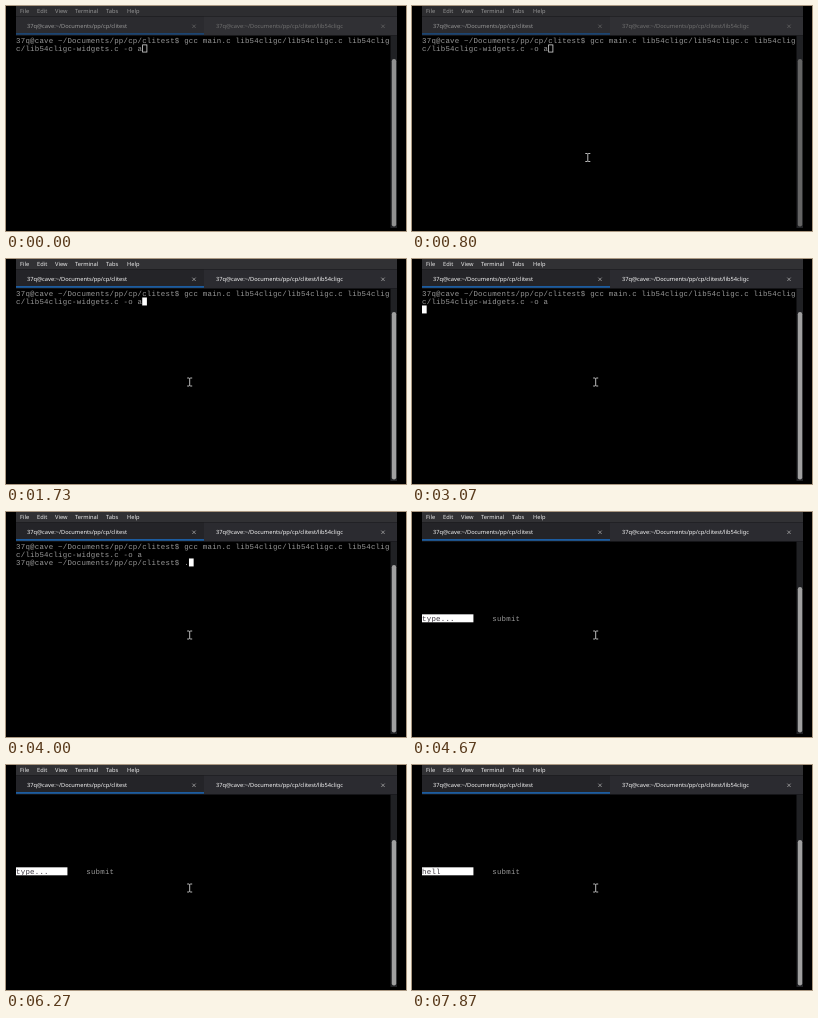
Recreate the animation shown at these times as an HTML page. Size 400 px wide and 225 px high, loop 8000 ms.

```html
<!DOCTYPE html>
<html lang="en">
<head>
<meta charset="utf-8">
<title>Terminal session</title>
<style>
  html, body { margin: 0; width: 100%; height: 100%; overflow: hidden; background: #000; }
  svg { display: block; width: 100%; height: 100%; }
  text { white-space: pre; text-rendering: geometricPrecision; }
  .ui { font: 500 5.7px "Noto Sans", sans-serif; }
  .mono { font: 7.4px "Liberation Mono", monospace; letter-spacing: 0.234px; }
</style>
</head>
<body>
<svg id="stage" viewBox="0 0 400 225"></svg>
<script>
const LOOP = 8000, FPS = 15;
const LEFT = 10, TOP = 30.5, COL = 4.675, ROW = 7.98;
const USER = "37q@cave", DIR = "~/Documents/pp/cp/clitest";
const PROMPT = `${USER} ${DIR}$ `;
const COMMAND = [PROMPT + "gcc main.c lib54cligc/lib54cligc.c lib54clig", "c/lib54cligc-widgets.c -o a"];
const GREY = "#989898", WHITE = "#ffffff";

const stage = document.getElementById("stage");

function add(tag, attrs, text) {
  const el = document.createElementNS("http://www.w3.org/2000/svg", tag);
  set(el, attrs);
  if (text) el.textContent = text;
  return stage.appendChild(el);
}
function set(el, attrs) {
  for (const key in attrs) el.setAttribute(key, attrs[key]);
}
const rect = (x, y, width, height, fill) => add("rect", { x, y, width, height, fill });
const label = (x, y, text) => add("text", { x, y, class: "ui" }, text);
const colX = c => LEFT + c * COL;
const rowY = r => TOP + r * ROW;
const cellText = (c, r) => add("text", { x: colX(c) + 0.1, y: rowY(r) + 6.5, class: "mono", fill: GREY });
const clamp = v => Math.max(0, Math.min(1, v));
const easeOut = v => 1 - (1 - v) ** 2;
const mix = (a, b, k) => `rgb(${a.map((v, i) => Math.round(v + (b[i] - v) * k))})`;
const grey = (a, b, k) => mix([a, a, a], [b, b, b], k);

// Window chrome
const menuBar = rect(10, 0, 381, 10.5);
const tabOne = rect(10, 10.5, 188, 19);
const tabTwo = rect(198, 10.5, 193, 19);
const tabLine = rect(10, 27, 188, 1.8);
rect(384.5, 29.5, 6.5, 192.5, "#202124");
const thumb = add("rect", { x: 385.8, width: 4.4, rx: 2.2 });
const menu = [[14, "File"], [31, "Edit"], [49, "View"], [69, "Terminal"], [100, "Tabs"], [121, "Help"]]
  .map(([x, name]) => label(x, 7.3, name));
const titles = [label(21, 22.3, `${USER}:${DIR}`), label(210, 22.3, `${USER}:${DIR}/lib54cligc`)];
const closers = [188, 377].map(x =>
  add("path", { d: `M${x - 1.7} 18.6l3.4 3.4m0-3.4l-3.4 3.4`, fill: "none", "stroke-width": 0.7 }));

// Terminal contents
const lines = [0, 1, 2].map(r => cellText(0, r));
const caret = add("rect", { width: COL, height: ROW, "stroke-width": 0.8 });
const field = rect(LEFT, rowY(9), 11 * COL, ROW, WHITE);
const button = rect(colX(15), rowY(9), 6 * COL, ROW, WHITE);
const fieldText = cellText(0, 9);
const buttonText = cellText(15, 9);
buttonText.textContent = "submit";

const pointer = add("path", {
  d: "M-2.5-4h2L0-3.5L.5-4h2M0-3.5v7M-2.5 4h2L0 3.5L.5 4h2",
  fill: "none", stroke: "#d0d0d0", "stroke-width": 0.9
});

const track = [[330, 57, 195], [800, 175.8, 151.5], [1130, 180, 132.5], [1600, 183.7, 123]];
function pointerAt(t) {
  let i = 0;
  while (i < track.length - 2 && t >= track[i + 1][0]) i++;
  const [a, b] = [track[i], track[i + 1]];
  const k = easeOut(clamp((t - a[0]) / (b[0] - a[0])));
  return [a[1] + (b[1] - a[1]) * k, a[2] + (b[2] - a[2]) * k];
}

// Number of key presses that have happened by time t
const typed = (t, times) => times.filter(at => t >= at).length;

function drawChrome(t) {
  const k = easeOut(clamp((t - 1140) / 300));
  set(menuBar, { fill: mix([45, 45, 48], [49, 49, 52], k) });
  set(tabOne, { fill: mix([43, 43, 47], [36, 36, 40], k) });
  set(tabTwo, { fill: mix([48, 48, 52], [43, 43, 48], k) });
  set(tabLine, { fill: mix([28, 68, 112], [28, 92, 160], k) });
  menu.forEach(m => set(m, { fill: grey(148, 235, k) }));
  titles.forEach((el, i) => set(el, { fill: grey(i ? 112 : 150, 245, k) }));
  closers.forEach(c => set(c, { stroke: grey(105, 180, k) }));
  const top = t < 4600 ? 53 : t < 4670 ? 64 : 75;
  const shade = t < 70 ? 145 : t < 130 ? 122 : 100;
  set(thumb, { y: top, height: 220.5 - top, fill: grey(shade, 160, k) });
}

function drawShell(t) {
  const on = t < 4600;
  const input = "./a".slice(0, typed(t, [4000, 4200, 4330]));
  const rows = [...COMMAND, t < 3200 ? "" : PROMPT + input];
  lines.forEach((el, i) => { el.textContent = on ? rows[i] : ""; });

  const r = t < 3070 ? 1 : 2;
  const c = t >= 3070 && t < 3200 ? 0 : rows[r].length;
  const solid = t >= 1200;
  const inset = solid ? 0 : 0.4;
  set(caret, {
    x: colX(c) + inset, y: rowY(r) + inset,
    width: COL - inset, height: ROW - 2 * inset,
    fill: solid ? WHITE : "none", stroke: solid ? "none" : "#d8d8d8",
    visibility: on ? "visible" : "hidden"
  });
}

function drawForm(t) {
  const on = t >= 4600;
  const onButton = t >= 5930 && t < 6270;
  const show = v => ({ visibility: v ? "visible" : "hidden" });
  const ink = v => ({ fill: v ? "#38323c" : GREY });
  set(field, show(on && !onButton));
  set(button, show(on && onButton));
  set(fieldText, { ...show(on), ...ink(!onButton) });
  set(buttonText, { ...show(on), ...ink(onButton) });
  fieldText.textContent = "hell".slice(0, typed(t, [7330, 7530, 7670, 7870])) || "type...";
}

function draw(t) {
  const step = Math.floor((t + 4) * FPS / 1000) * 1000 / FPS;
  drawChrome(t);
  drawShell(t);
  drawForm(t);
  const [x, y] = pointerAt(step);
  set(pointer, { transform: `translate(${x} ${y})`, visibility: t < 330 ? "hidden" : "visible" });
}

const start = performance.now();
function tick() {
  draw((performance.now() - start) % LOOP);
  requestAnimationFrame(tick);
}
draw(0);
requestAnimationFrame(tick);
</script>
</body>
</html>
```
